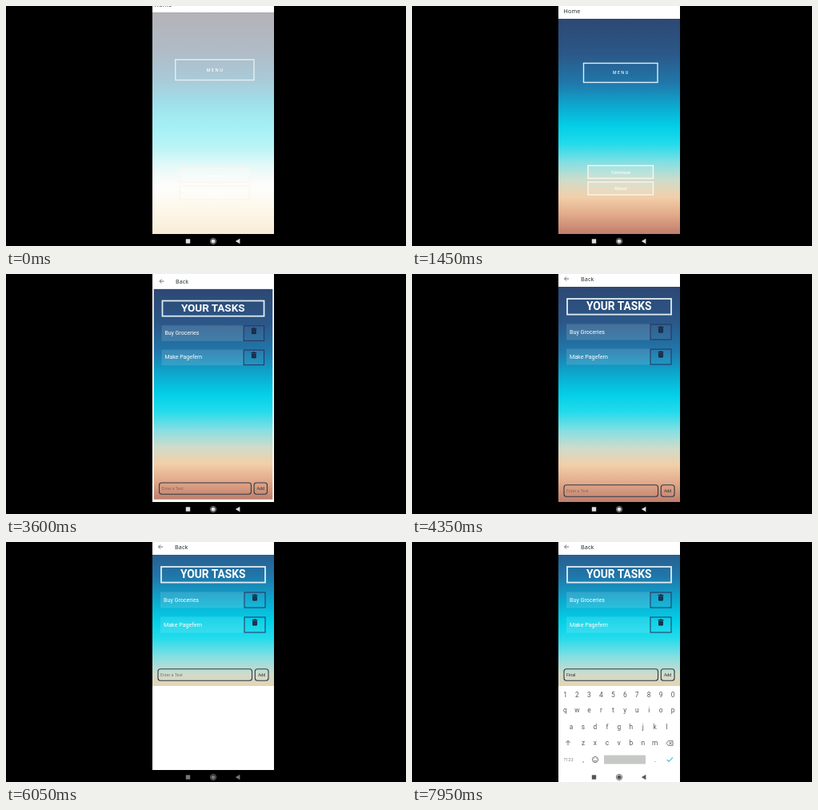
Recreate the animation shown at these times as an HTML page. Size 500x300 px, loop 8 s.

```html
<!DOCTYPE html>
<html lang="en">
<head>
<meta charset="utf-8">
<title>Task app</title>
<style>
html, body { margin: 0; width: 100%; height: 100%; overflow: hidden; background: #000; }
svg { display: block; width: 500px; height: 300px; }
text { font-family: Roboto, sans-serif; }
.title { font: 500 7.2px "Noto Sans", sans-serif; letter-spacing: .15px; fill: #24342c; }
.mid { text-anchor: middle; }
.outline { fill: none; stroke: #e2edf2; stroke-width: 1.4; }
.button { fill: #fff; fill-opacity: .14; stroke: #fff6ea; stroke-width: 1.4; }
.label { font: 600 5.4px "Open Sans", sans-serif; fill: #fff; text-anchor: middle; }
.task { font-size: 7.15px; fill: #fff; }
.field { fill: none; stroke: #2c3a48; stroke-width: 1.1; }
.small { font-size: 5.3px; }
.key { font-size: 8.4px; fill: #555b57; text-anchor: middle; }
.line { fill: none; stroke: #4c5450; stroke-width: .8; }
</style>
</head>
<body>
<svg viewBox="0 0 500 300">
  <defs>
    <linearGradient id="sky" gradientUnits="userSpaceOnUse" x1="0" y1="16" x2="0" y2="285">
      <stop offset="0" stop-color="#2d4873"/>
      <stop offset=".16" stop-color="#2b5788"/>
      <stop offset=".3" stop-color="#2078ab"/>
      <stop offset=".4" stop-color="#0da6cd"/>
      <stop offset=".5" stop-color="#03cfe7"/>
      <stop offset=".58" stop-color="#22dbec"/>
      <stop offset=".67" stop-color="#86dfe2"/>
      <stop offset=".75" stop-color="#cfdcca"/>
      <stop offset=".83" stop-color="#f2cfa8"/>
      <stop offset=".91" stop-color="#e2aa8a"/>
      <stop offset="1" stop-color="#bf7e6c"/>
    </linearGradient>
    <linearGradient id="haze" x1="0" y1="0" x2="0" y2="1">
      <stop offset="0" stop-color="#dcd2cb" stop-opacity=".78"/>
      <stop offset=".2" stop-color="#e4e4e2" stop-opacity=".72"/>
      <stop offset=".4" stop-color="#ecfffa" stop-opacity=".66"/>
      <stop offset=".6" stop-color="#f4fffc" stop-opacity=".72"/>
      <stop offset=".76" stop-color="#fff" stop-opacity=".95"/>
      <stop offset="1" stop-color="#fffbe2" stop-opacity=".85"/>
    </linearGradient>
    <clipPath id="screen"><rect x="183" width="152" height="285"/></clipPath>
    <clipPath id="phone"><rect x="183" width="152" height="300"/></clipPath>
    <g id="bin" fill="#14233a">
      <path d="M-3.4-3.2h2l.6-.8h1.6l.6.8h2v1h-6.8zM-2.9-1.7h5.8v5q0 .9-.9.9h-4q-.9 0-.9-.9z"/>
      <path d="M-1-.5v3.5M1-.5v3.5" stroke="#3d6c94" stroke-width=".5"/>
    </g>
  </defs>
  <rect width="500" height="300"/>
  <g clip-path="url(#screen)">
    <rect x="183" width="152" height="285" fill="#fff"/>

    <g id="home">
      <rect x="183" width="152" height="16" fill="#fff"/>
      <text class="title" x="189.5" y="8.8">Home</text>
      <rect x="183" y="16" width="152" height="269" fill="url(#sky)"/>
      <rect id="veil" x="183" y="16" width="152" height="269" fill="url(#haze)"/>
      <rect class="outline" x="214.5" y="71.5" width="92.5" height="24"/>
      <text class="label" x="261.5" y="85.3" style="letter-spacing:1.5px;font-size:5px">MENU</text>
      <rect class="button" x="220" y="199.5" width="81.5" height="16"/>
      <text class="label" x="261" y="209.6">Continue</text>
      <rect class="button" x="220" y="220" width="81.5" height="16"/>
      <text class="label" x="261" y="230">About</text>
    </g>

    <g id="tasks">
      <rect x="183" width="152" height="285" fill="#fff"/>
      <path class="line" d="M196.2 6h-5.6m2.5-2.6L190.5 6l2.6 2.6"/>
      <text class="title" x="211" y="8.6">Back</text>
      <rect id="tasksSky" x="183" y="16" width="152" height="269" fill="url(#sky)"/>
      <rect class="outline" x="194" y="31" width="130" height="19.6" stroke-width="2" style="stroke-width:1.8"/>
      <text class="mid" x="258.7" y="45.3" font-size="13.8" font-weight="700" fill="#fff">YOUR TASKS</text>
      <g id="rows"></g>
      <g id="entry">
        <rect class="field" x="190" y="263.7" width="117.5" height="14.6" rx="3"/>
        <text id="typed" class="small" x="193" y="273"></text>
        <rect class="field" x="311.3" y="263.7" width="16.7" height="14.6" rx="3"/>
        <text class="small mid" x="319.6" y="273" fill="#2b3035">Add</text>
      </g>
    </g>
  </g>

  <g clip-path="url(#phone)">
    <rect id="navBack" x="183" y="285" width="152" height="15"/>
    <g id="keyboard">
      <rect x="183" y="180" width="152" height="120" fill="#fff"/>
      <g id="keys"></g>
      <path class="line" d="M195 254.2v-5.8m-2.7 2.7l2.7-2.8 2.7 2.8"/>
      <path class="line" d="M318 251.5l2.4-2.8h5.6v5.6h-5.6zM321.6 250l2.8 3m0-3l-2.8 3"/>
      <text class="mid" x="195.5" y="274" font-size="5.6" fill="#85877a">?123</text>
      <text class="key" x="214" y="274.5">,</text>
      <circle class="line" cx="229" cy="272" r="3.6"/>
      <path class="line" d="M227.2 273q1.8 2.2 3.6 0M227.6 270.4v.8M230.4 270.4v.8"/>
      <rect x="240" y="266.5" width="52" height="11" rx="1" fill="#c6c8c6"/>
      <text class="key" x="304" y="274.5">.</text>
      <path class="line" d="M318.8 272.2l2.2 2.2 5-5" style="stroke:#45bfe0;stroke-width:1.3"/>
    </g>
    <g id="navIcons">
      <rect x="224.8" y="291.3" width="5.4" height="5.4"/>
      <circle cx="259" cy="294" r="2.6"/>
      <circle cx="259" cy="294" r="3.7" fill="none" stroke="currentColor" stroke-width=".8"/>
      <path d="M292.4 290.8v6.4l-5.6-3.2z"/>
    </g>
  </g>
</svg>
<script>
const LOOP = 8000, OPEN_TASKS = 3450, FOCUS = 6000, KEYBOARD = 6080;
const WORD = 'Final', TYPE_START = 6800, TYPE_STEP = 200;
const $ = id => document.getElementById(id);
const clamp = v => Math.max(0, Math.min(1, v));
const easeOut = p => 1 - (1 - clamp(p)) ** 4;

$('rows').innerHTML = ['Buy Groceries', 'Make Pagefern'].map((name, i) => `
  <g transform="translate(0 ${i * 31})">
    <rect x="193" y="62.5" width="105" height="20" fill="#fff" fill-opacity=".13"/>
    <rect x="298" y="63" width="26" height="19" fill="#fff" fill-opacity=".04" stroke="#2b2f5b" stroke-width="1"/>
    <text class="task" x="197" y="74.5">${name}</text>
    <use href="#bin" x="311" y="69.3"/>
  </g>`).join('');

const keyRows = [['1234567890', 191.5, 191], ['qwertyuiop', 191.5, 210.5],
  ['asdfghjkl', 199, 231], ['zxcvbnm', 214, 251.5]];
$('keys').innerHTML = keyRows.map(([letters, x, y]) => [...letters].map((c, i) =>
  `<text class="key" x="${x + i * 14.95}" y="${y + 2.8}">${c}</text>`).join('')).join('');
const keys = [...$('keys').children].map(node => ({ node, lower: node.textContent }));

function zoom(id, scale, opacity) {
  $(id).setAttribute('transform', `translate(259 142.5) scale(${scale}) translate(-259 -142.5)`);
  $(id).setAttribute('opacity', opacity);
}

function render(t) {
  // Home settles from an entry already under way, then gives way to the list
  const entering = 1 - easeOut((t + 44) / 400);
  const opening = (t - OPEN_TASKS) / 400;
  const fade = clamp((t - OPEN_TASKS) / 130);
  zoom('home', 1 + .1 * (entering + easeOut(opening)), 1 - fade);
  $('veil').setAttribute('opacity', clamp(entering / .625));
  zoom('tasks', .85 + .15 * easeOut(opening), fade);

  // The keyboard shortens the page; the background stays centred
  const shrink = t >= FOCUS ? 105 : 0;
  $('sky').setAttribute('gradientTransform', `translate(0 ${-shrink / 2})`);
  $('tasksSky').setAttribute('height', 269 - shrink);
  $('entry').setAttribute('transform', `translate(0 ${-shrink})`);

  const shown = t >= KEYBOARD;
  $('keyboard').setAttribute('visibility', shown ? 'visible' : 'hidden');
  $('keyboard').setAttribute('transform', `translate(0 ${120 * (1 - easeOut((t - KEYBOARD) / 220))})`);
  $('navBack').setAttribute('fill', shown ? '#fff' : '#000');
  const iconColor = shown ? '#555' : shrink ? '#777' : '#dedede';
  $('navIcons').setAttribute('fill', iconColor);
  $('navIcons').setAttribute('color', shrink ? iconColor : '#999');

  const count = Math.max(0, Math.floor((t - TYPE_START) / TYPE_STEP) + 1);
  $('typed').textContent = WORD.slice(0, count) || 'Enter a Text';
  $('typed').setAttribute('fill', count ? '#2b3035' : shrink ? '#6c7778' : '#8b6a5f');
  for (const { node, lower } of keys) node.textContent = count ? lower : lower.toUpperCase();
}

const start = performance.now();
function tick() {
  render((performance.now() - start) % LOOP);
  requestAnimationFrame(tick);
}
tick();
</script>
</body>
</html>
```
